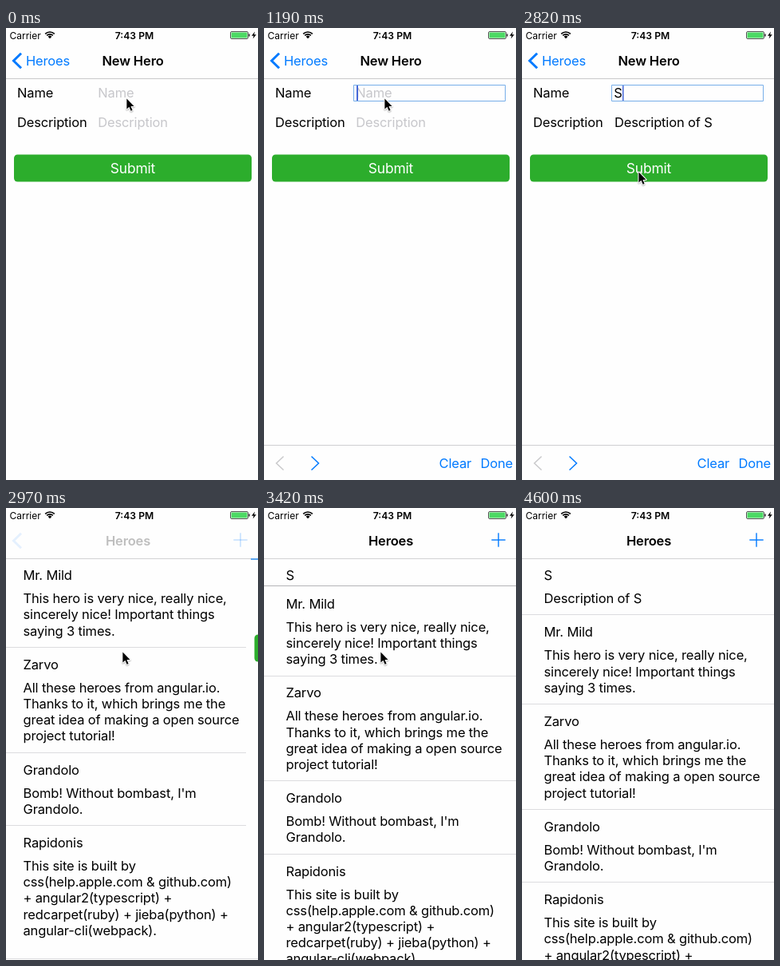
An HTML page with a canvas that plays this animation: 316 px wide and 566 px high, repeating every 5190 ms.

```html
<!DOCTYPE html>
<html lang="en">
<head>
<meta charset="utf-8">
<title>Hero list</title>
<style>
  html, body { margin: 0; width: 100%; height: 100%; overflow: hidden; background: #fefefe; }
  canvas { display: block; width: 316px; height: 566px; }
</style>
</head>
<body>
<canvas id="stage"></canvas>
<script>
const W = 316, H = 566, LOOP = 5190, STEPS = 35;
const BLUE = '#007aff', BG = '#fefefe', LINE = '#dcdcdf', GREEN = '#2cad2c';
const NAV_Y = 63, LINE_HEIGHT = 20.2;

// Moments of the story, in steps of the loop
const RING = 3, FOCUS = 5, TYPED = 11, POP = 20, LIST = 21, INSERT = 22, LEAVE = 31;

// Key points of the pointer: [step, x, y]
const pointerKeys = [[14, 152, 88], [15, 154.5, 159], [17, 147, 180], [23, 147, 180],
  [24, 162, 218], [25, 212, 407], [27, 223, 537]];

const added = ['S', 'Description of S'];
const heroes = [
  ['Mr. Mild', 'This hero is very nice, really nice,', 'sincerely nice! Important things', 'saying 3 times.'],
  ['Zarvo', 'All these heroes from angular.io.', 'Thanks to it, which brings me the', 'great idea of making a open source', 'project tutorial!'],
  ['Grandolo', "Bomb! Without bombast, I'm", 'Grandolo.'],
  ['Rapidonis', 'This site is built by', 'css(help.apple.com & github.com)', '+ angular2(typescript) +', 'redcarpet(ruby) + jieba(python) +', 'angular-cli(webpack).']
];

const canvas = document.getElementById('stage');
const ctx = canvas.getContext('2d');
const dpr = window.devicePixelRatio || 1;
canvas.width = W * dpr;
canvas.height = H * dpr;

const clamp = (v, max = 1) => Math.max(0, Math.min(max, v));
const smooth = v => v * v * (3 - 2 * v);
const easeOut = v => 1 - (1 - v) ** 2.5;
const mix = (a, b, v) => a + (b - a) * v;

function text(str, x, y, { color = '#000', size = 16.5, weight = 400, align = 'left' } = {}) {
  ctx.font = `${weight} ${size}px Inter, sans-serif`;
  ctx.letterSpacing = size > 13 ? '-0.15px' : '0px';
  ctx.textAlign = align;
  ctx.fillStyle = color;
  ctx.fillText(str, x, y);
}

function rect(x, y, w, h, color) {
  ctx.fillStyle = color;
  ctx.fillRect(x, y, w, h);
}

function trace(points) {
  ctx.beginPath();
  points.forEach(([x, y]) => ctx.lineTo(x, y));
}

function stroke(color, width) {
  ctx.strokeStyle = color;
  ctx.lineWidth = width;
  ctx.stroke();
}

function chevron(x, y, w, h, color, width) {
  trace([[x + w, y - h], [x, y], [x + w, y + h]]);
  stroke(color, width);
}

function pill(x, y, w, h, r, color) {
  ctx.beginPath();
  ctx.roundRect(x, y, w, h, r);
  ctx.fillStyle = color;
  ctx.fill();
}

function faded(alpha, draw) {
  ctx.save();
  ctx.globalAlpha = alpha;
  draw();
  ctx.restore();
}

function statusBar() {
  text('Carrier', 4.5, 13.5, { size: 12 });
  text('7:43 PM', 161, 13.5, { size: 12.2, weight: 600, align: 'center' });

  const wave = r => ctx.arc(55, 13.2, r, -Math.PI * 0.75, -Math.PI * 0.25);
  for (const r of [8.2, 5.4]) {
    ctx.beginPath();
    wave(r);
    stroke('#000', 1.7);
  }
  ctx.beginPath();
  ctx.moveTo(55, 13.2);
  wave(3.4);
  ctx.fillStyle = '#000';
  ctx.fill();

  ctx.beginPath();
  ctx.roundRect(281.5, 4.5, 22, 9, 1.5);
  stroke('#555', 1);
  rect(282.5, 5.5, 20, 7, '#4cd964');
  pill(304.3, 7.3, 1.5, 3.4, 0.7, '#333');

  trace([[312, 4.5], [308, 9.8], [310.6, 9.8], [309.6, 13.6], [313.8, 8.2], [311.1, 8.2]]);
  ctx.fillStyle = '#000';
  ctx.fill();
}

const backArrow = () => chevron(9.5, 41, 9.5, 9.3, BLUE, 3);

function formPage(n) {
  backArrow();
  text('Heroes', 25, 47, { color: BLUE });
  text('New Hero', 159, 47, { weight: 600, align: 'center' });
  rect(0, NAV_Y, W, 1, '#c9c9cb');

  const typed = n >= TYPED;
  const hint = { color: '#c7c7cb' };
  text('Name', 14, 87);
  text('Description', 14, 124);
  text(typed ? 'S' : 'Name', 115.3, 87, typed ? {} : hint);
  text(typed ? 'Description of S' : 'Description', typed ? 116 : 115.3, 124, typed ? {} : hint);

  if (n >= RING) {
    const grow = n === RING ? 1 : 0;
    ctx.beginPath();
    ctx.rect(112.5 - grow, 71.5 - grow, 190 + 2 * grow, 20 + 2 * grow);
    stroke(grow ? '#b5d2f3' : '#77aee9', 1);
  }

  pill(10, 158.5, 298, 34, 4.5, GREEN);
  text('Submit', 159, 182, { color: '#fff', size: 17.4, align: 'center' });

  if (n >= FOCUS) caret(n, typed);
  if (n >= 1) toolbar(n);
}

// Typing keeps the caret lit for four steps; then it dims, goes out and returns.
function caret(n, typed) {
  const since = n - (typed ? TYPED + 4 : FOCUS);
  const light = clamp(Math.abs(since - 1.2) - 0.8);
  faded(light, () => rect(typed ? 126 : 116, 72, typed ? 1.5 : 2, 19, '#4668d8'));
}

function toolbar(n) {
  ctx.save();
  ctx.translate(0, Math.round(44 * (1 - clamp(n / 3)) ** 2));
  rect(0, 522, W, 44, BG);
  rect(0, 522, W, 1, '#cfcfd1');
  chevron(15.5, 545, 9, 8.5, '#c9c9cb', 1.5);
  chevron(68.5, 545, -9, 8.5, BLUE, 1.5);
  text('Clear', 219.5, 551, { color: BLUE });
  text('Done', 312, 551, { color: BLUE, align: 'right' });
  ctx.restore();
}

const rowHeight = row => 51 + LINE_HEIGHT * (row.length - 1);

function heroRow([name, ...lines], top) {
  text(name, 27.5, Math.round(top + 27.3));
  lines.forEach((line, i) => text(line, 27.5, Math.round(top + 56.4 + i * LINE_HEIGHT)));
}

function listPage(n) {
  const popping = n < LIST;
  const dx = popping ? -6 : 0;
  const opening = smooth(clamp((n - INSERT) / 2));

  faded(popping ? 0.25 : 1, () => {
    text('Heroes', 159 + dx, 47, { weight: 600, align: 'center' });
    rect(285.3, 39.3, 17.4, 1.4, BLUE);
    rect(293.3, 31.3, 1.4, 17.4, BLUE);
  });
  if (popping) faded(0.1, backArrow);

  ctx.save();
  ctx.beginPath();
  ctx.rect(0, NAV_Y + 1, W, H);
  ctx.clip();
  ctx.translate(dx, 0);
  let top = 62.8;
  if (opening) {
    heroRow(added, top);
    top += rowHeight(added) * opening;
    rect(0, Math.floor(top), W, H, BG);
    rect(0, Math.floor(top - 0.5), W, 1, n < INSERT + 3 ? '#b4b4b7' : LINE);
  }
  for (const row of heroes) {
    heroRow(row, top);
    top += rowHeight(row);
    if (row !== heroes.at(-1)) rect(-dx, Math.floor(top), W, 1, LINE);
  }
  ctx.restore();

  rect(0, NAV_Y, W, 1, '#d2d2d4');
  if (popping) leavingForm();
}

// Last sliver of the form as it slides off to the right
function leavingForm() {
  rect(301, NAV_Y + 1, W, H, BG);
  rect(0, 564, W, 1, LINE);
  rect(307, NAV_Y, 9, 2, '#5aa5f0');
  pill(311.5, 158.5, 40, 34, 4.5, GREEN);
}

function pointerAt(n) {
  const next = pointerKeys.findIndex(key => key[0] > n);
  if (next === 0) return pointerKeys[0].slice(1);
  if (next < 0) {
    const [step, x, y] = pointerKeys.at(-1);
    return [x + 10 * clamp(n - step, 2), y];
  }
  const [a, ax, ay] = pointerKeys[next - 1];
  const [b, bx, by] = pointerKeys[next];
  const v = easeOut((n - a) / (b - a));
  return [mix(ax, bx, v), mix(ay, by, v)];
}

function pointer(n) {
  const [x, y] = pointerAt(n);
  ctx.save();
  ctx.translate(x - 0.6, y);
  ctx.lineJoin = 'round';
  ctx.shadowColor = 'rgba(0,0,0,0.3)';
  ctx.shadowBlur = 1.5 * dpr;
  ctx.shadowOffsetY = dpr;
  trace([[0, 0.5], [0, 13.6], [3, 10.8], [5.2, 15.8], [7.2, 15], [5.1, 10], [9.2, 10]]);
  ctx.closePath();
  stroke('#fff', 2);
  ctx.shadowColor = 'transparent';
  ctx.fillStyle = '#000';
  ctx.fill();
  ctx.restore();
}

function frame() {
  // The screen advances in even steps; the small lead rounds each one early.
  const n = Math.floor((performance.now() + 6) % LOOP / LOOP * STEPS);
  ctx.setTransform(dpr, 0, 0, dpr, 0, 0);
  rect(0, 0, W, H, BG);
  statusBar();
  n < POP ? formPage(n) : listPage(n);
  if (n < LEAVE) pointer(n);
  requestAnimationFrame(frame);
}
requestAnimationFrame(frame);
</script>
</body>
</html>
```
